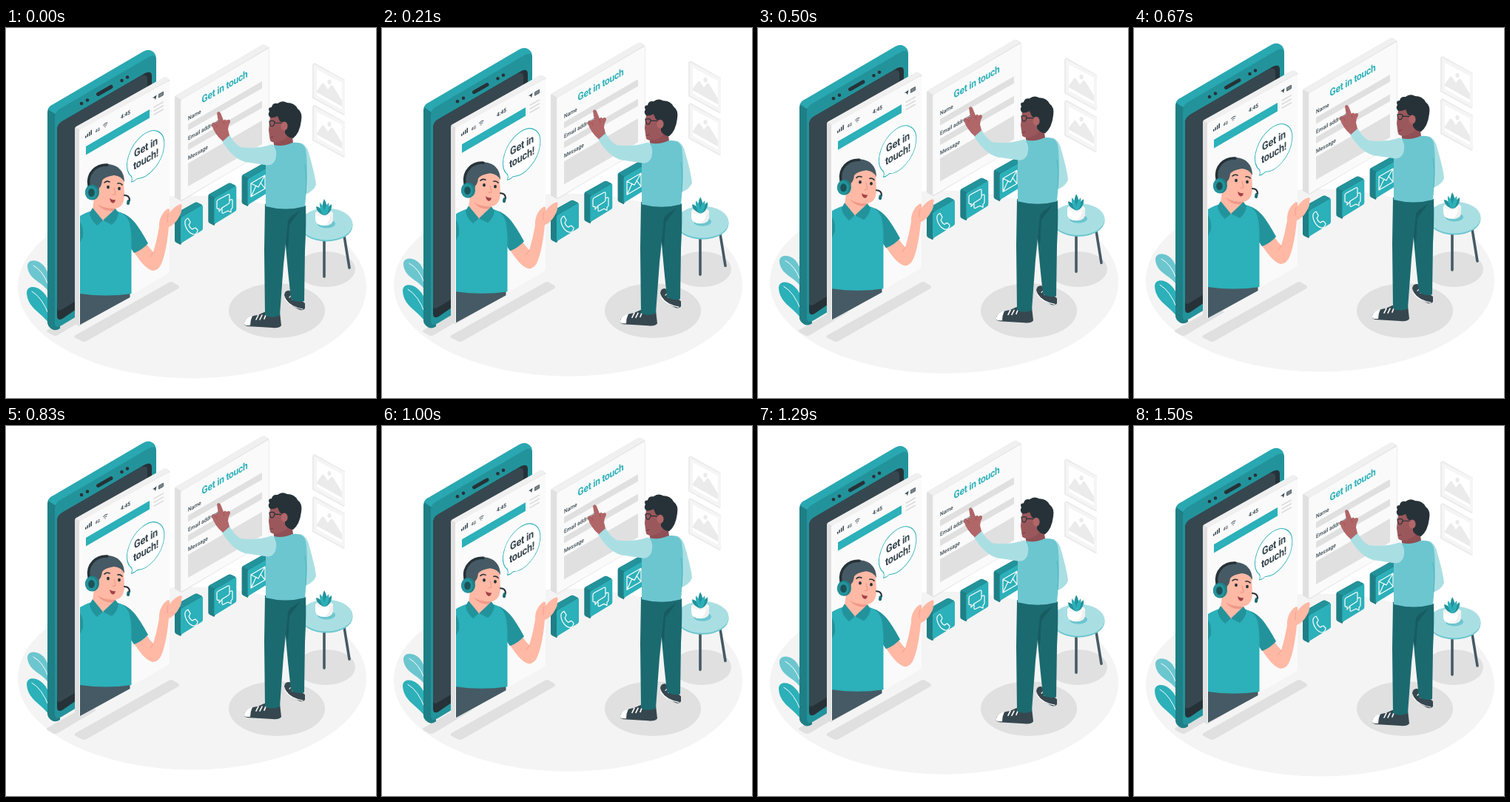
Recreate the animation shown at these times as an HTML page. Size 500 px wide and 500 px high, loop 1.54 s.

```html
<!DOCTYPE html>
<html lang="en">
<head>
<meta charset="utf-8">
<title>Get in touch</title>
<style>
  html, body { margin: 0; height: 100%; overflow: hidden; background: #fff; }
  svg { display: block; width: 100vw; height: 100vh; }
  text { font: 500 7.6px Roboto, sans-serif; fill: #37474f; }
  .bold { font-weight: 700; font-size: 14.6px; letter-spacing: -.25px; }
  .mid { text-anchor: middle; }
  .line { fill: none; stroke-linecap: round; stroke-linejoin: round; }
  .teal { fill: #2cb0b9; }
  .deep { fill: #23939b; }
  .shade { fill: #1f7f86; }
  .soft { fill: #6cc6cf; }
  .pale { fill: #a9dfe3; }
  .pants { fill: #1b6a70; }
  .dark { fill: #37474f; }
  .ink { fill: #263238; }
  .grey { fill: #e0e0e0; }
  .paper { fill: #fafafa; }
  .skin { fill: #ffb9a5; }
  .brown { fill: #b16668; }
  .white { stroke: #fff; }
</style>
</head>
<body>
<svg viewBox="0 0 500 500">
  <defs>
    <g id="picture">
      <path fill="#ebebeb" d="M414 49l3-2 41 23v47l-2 1-42-23z"/>
      <path fill="#f5f5f5" d="M416 49l42 22v46l-42-23z"/>
      <path fill="#fff" d="M420 56l34 18v36l-34-19z"/>
      <path fill="#ebebeb" d="M420 85l7-10q2-2 4 2l4 6 4-5q2-2 4 2l11 18v8l-34-19z"/>
      <ellipse cx="437" cy="73" rx="2.6" ry="3.2" fill="#ebebeb"/>
    </g>
    <g id="button">
      <path class="shade" d="M228 253q0-2 2-3l25-14q2-1 4 0l6 3-29 54-6-3q-2-1-2-3z"/>
      <path class="deep" d="M229 251l27-15q2-1 3 0l6 3-28 16z"/>
      <path class="teal" d="M236 258q0-2 2-3l26-15q2-1 2 1v30q0 2-2 3l-26 16q-2 1-2-1z"/>
    </g>
  </defs>

  <g class="float">
    <ellipse cx="251.5" cy="350" rx="235.5" ry="123.5" fill="#f4f4f4"/>
  </g>

  <g class="grey">
    <ellipse cx="432" cy="326" rx="40" ry="24"/>
    <ellipse cx="366" cy="382" rx="65" ry="37"/>
    <path d="M94 415L220 344q3-2 6 0l7 4q2 2 0 4L109 423q-4 2-7 0l-8-4q-3-2 0-4z"/>
    <path d="M56 408L110 377l12 7-52 31q-4 2-7 0l-7-4q-2-1 0-3z"/>
  </g>

  <g class="float">
    <use href="#picture"/>
    <use href="#picture" y="57"/>

    <!-- form -->
    <path class="grey" d="M228 94q0-2 2-3L346 23q2-1 4 0l5 3V163L239 233q-2 1-4 0l-7-4z"/>
    <path fill="#f0f0f0" d="M229 92L346 23q2-1 4 0l5 3L237 97z"/>
    <path class="paper" stroke="#e6e6e6" stroke-width=".7" d="M236 99q0-2 2-3L353.500 28q2-1 2 1V162q0 2-2 3L238 232.500q-2 1-2-1z"/>
    <text class="iso bold mid" data-at="295.500 84" style="font-size:13.800px;fill:#2cb0b9">Get in touch</text>
    <g class="grey">
      <path d="M246 130l100-58v9.500l-100 57z"/>
      <path d="M246 156.500l100-58v9.500l-100 57z"/>
      <path d="M246 183l100-58v32l-100 57z"/>
    </g>
    <text class="iso" data-at="246 125">Name</text>
    <text class="iso" data-at="246 152">Email address</text>
    <text class="iso" data-at="246 178.500">Message</text>

    <!-- contact buttons -->
    <use href="#button"/>
    <use href="#button" x="45.300" y="-26"/>
    <use href="#button" x="90.600" y="-52"/>
    <g class="line white" stroke-width="1.200">
      <path d="M242 261q1-3 4-4l3 5q0 2-2 4 2 5 5 6 2-2 4-2l3 3q0 4-4 6-5 0-9-5-5-7-4-13z"/>
      <path d="M285 235q0-2 2-3l13-7q2-1 2 1v9q0 2-2 3l-8 5-4 5v-4q-3 1-3-1zM302 233l2-1q2-1 2 1v9q0 2-2 3v4l-4-2-6 3q-2 1-2-1v-6"/>
      <path d="M331 210l19-11v18l-19 11zl10 5 9-16M331 228l7-15M350 217l-6-8"/>
    </g>

    <!-- floor plant -->
    <path class="soft" d="M58 357C50 343 31 341 29 323C28 314 38 312 46 317C53 321 57 330 58 337z"/>
    <path class="teal" d="M59 400C46 383 29 378 28 358C28 348 40 348 48 355C54 360 57 366 59 373z"/>
    <path class="line white" d="M37 321Q50 328 57 347M35 356Q49 364 58 388"/>

    <!-- phone -->
    <path class="shade" d="M56 114Q56 108 62 104L73 109V406Q67 410 62 407Q56 403 56 398z"/>
    <path fill="#29a8b1" d="M57 110Q58 106 62 104L185 32Q192 28 197 31Q203 34 203 42L73 112 66 116z"/>
    <path class="deep" d="M66 121Q66 113 73 109L193 39Q203 34 203 43V325L75 402Q66 407 66 398z"/>
    <path class="ink" d="M69 138Q69 130 76 126L188 61Q197 57 197 65V310L76 393Q69 396 69 389z"/>
    <path class="dark" d="M69 138Q69 130 76 126L182 65Q191 61 191 69V310L76 380Q69 384 69 378z"/>
    <path class="line" stroke="#263238" stroke-width="5" d="M124.500 89.500l17.500-10"/>
    <g class="ink">
      <circle cx="102" cy="102" r="2.300"/><circle cx="110" cy="97.500" r="2.300"/>
      <circle cx="156.500" cy="71" r="2.300"/><circle cx="164" cy="66.500" r="2.300"/>
    </g>

    <!-- floating screen -->
    <path class="grey" d="M93 136q0-2 2-3L213 67q2-1 4 0l4 3v260L101 402q-2 1-4 0l-4-3z"/>
    <path fill="#f0f0f0" d="M94 134L213 67q2-1 4 0l4 3L100 138z"/>
    <path class="paper" d="M99 140q0-2 2-3L219 72q2-1 2 1v256q0 2-2 3L101 401q-2 1-2-1z"/>
    <g class="dark">
      <path d="M107 146l1.500-.8v3l-1.500.8zm2.500-2.600l1.500-.8v4.200l-1.500.8zm2.500-2.600l1.500-.8v5.400l-1.500.8zm2.500-2.600l1.500-.8v6.600l-1.500.8z"/>
      <path d="M198 94.500l5.500-4-1.500 6.500-1.500-2.500z"/>
    </g>
    <path fill="#78848a" stroke="#37474f" stroke-width=".7" d="M206.500 89.500l6-3.400v4.600l-6 3.400z"/>
    <path class="line" stroke="#37474f" stroke-width="1" d="M131.500 131.500q2.500-3.800 5.500-3.500M132.700 132.800q1.600-2.300 3.300-2M134 134l.3-.2"/>
    <text class="iso" data-at="120.500 142" style="font-size:6px">4G</text>
    <text class="iso mid" data-at="161.500 119.500" style="font-size:7.500px;font-weight:700">4:45</text>
    <path class="teal" d="M108 160l86-50v11.500l-86 50z"/>
    <path class="line" stroke="#dcdcdc" stroke-width="1.600" d="M200 107l12.500-7M200 112l12.500-7M200 117l12.500-7"/>
    <path class="iso" data-at="188.500 171" fill="#fff" stroke="#2cb0b9" d="M-25 14.500A29 29 0 1 1-13 26Q-17 28-22 26Q-19 21-25 14.500z"/>
    <text class="iso bold mid" data-at="189 166">Get in</text>
    <text class="iso bold mid" data-at="189 182.500">touch!</text>

    <!-- agent -->
    <path fill="#455a64" d="M100 355h67.500v9L100 401z"/>
    <path class="skin" d="M173 303L190 292Q195 299 199 303Q204 287 207 269C206 257 213 247 219 244Q222 244 221 250Q228 240 236 238Q239 239 237 243Q238 248 234 255Q229 265 220 269Q217 300 211 316Q207 328 198 328C188 325 180 313 173 303z"/>
    <path class="line" stroke="#f0998a" stroke-width=".8" d="M219 251q-2 6-1 11M199 303l-4 6"/>
    <path class="deep" d="M150 249C168 250 178 266 192 291Q184 300 173 304L160 285z"/>
    <path class="teal" d="M100 254Q110 248 120 246L148 247Q163 250 167 264Q170 276 169.500 300V359Q135 364 100 359z"/>
    <path class="deep" d="M100 262q5 7 4 20l-4 8z"/>
    <path class="skin" d="M119 229h29v19L131 261 117 246z"/>
    <path fill="#f0998a" d="M124 238Q133 245 147 243V247Q131 249 124 238z"/>
    <path class="deep" d="M117 243L131 260 123 267Q114 259 113 250zM148 244L131 260 143 266Q151 259 152 250z"/>
    <path class="skin" d="M119 202Q121 192 138 192Q157 192 159 207L160 225Q160 243 146 244Q130 244 123 233Q118 224 119 202z"/>
    <path fill="#455a64" d="M112 213C109 195 122 183 138 184C152 185 160 194 160 208Q156 200 146 199Q133 201 130 206Q129 214 126 216L124 228Q113 227 112 213z"/>
    <path class="line" stroke="#263238" stroke-width="3.500" d="M112 213C109 196 122 184 137 185"/>
    <ellipse class="shade" cx="116.500" cy="222" rx="9.500" ry="10.500"/>
    <ellipse class="deep" cx="115" cy="222.500" rx="8" ry="9.500"/>
    <ellipse cx="115.500" cy="222.500" rx="4.300" ry="5.500" fill="#1c5258"/>
    <g class="ink">
      <ellipse cx="138" cy="215" rx="1.900" ry="2.300"/>
      <ellipse cx="153" cy="217" rx="1.900" ry="2.300"/>
    </g>
    <path class="line" stroke="#263238" stroke-width="1.600" d="M133 209q3-3 7-1M151 210q4-1 6 2"/>
    <path class="line" stroke="#f0998a" stroke-width="1.200" d="M146 216l2 8q-1 2-4 1"/>
    <path fill="#a34048" d="M140 230q4 3 8 2-1 5-4 4.500-3-1-4-6.500z"/>
    <path class="line" stroke="#263238" stroke-width="2" d="M160 226q7 0 7 7"/>
    <path class="line" stroke="#1b6a70" stroke-width="4" d="M165.500 234l-.5 3"/>

    <!-- side table -->
    <path class="line" stroke="#455a64" stroke-width="3.600" d="M430 286v50M457 281l7 43"/>
    <ellipse class="soft" cx="433" cy="267" rx="35.500" ry="21.500"/>
    <ellipse class="pale" cx="433" cy="265" rx="35.500" ry="21.500"/>
    <ellipse class="soft" cx="433" cy="264.500" rx="12" ry="6"/>
    <path fill="#fff" d="M418 250q12-5 24 0v9q-1 8-12 8t-12-8z"/>
    <path fill="#f0f0f0" d="M442 250v9q-1 8-12 8 8-4 8-16z"/>
    <ellipse cx="430" cy="250.500" rx="12" ry="4.500" fill="#f5f5f5"/>
    <path class="deep" d="M427 252q-8-4-8-11 6 1 9 7-2-8 2-17 5 8 3 17 2-7 7-10 1 9-6 14-4 2-7 0z"/>
    <path class="teal" d="M429 253q-6-8-5-17 6 5 6 13 1-8 6-13 2 10-4 17z"/>

    <!-- visitor -->
    <path class="dark" d="M376 361Q377 354 383 355L404 372V379Q401 383 395 380Q379 373 376 361z"/>
    <path class="line white" stroke-width="1.200" d="M377 366q7 11 24 14M383 364l4-4M387 367l3-4"/>
    <path class="dark" d="M322 398Q324 390 340 388L349 384H370L372 402Q369 406 360 405L326 403Q321 402 322 398z"/>
    <path fill="#fff" d="M322 398Q324 391 333 389Q330 395 330 402L325 402Q321 401 322 398z"/>
    <path class="line white" stroke-width="1.600" d="M338 394l3-6M343 394l3-6M349 393l2-5"/>
    <path class="pants" d="M374 240H405Q406 265 404 300L403 369Q394 372 385 366Q381 330 378 295z"/>
    <path fill="#175b60" d="M380 258L398 246 383 266 381 300 377 288z"/>
    <path class="pants" d="M350 238H396L381 260Q378 292 375 320L370 388Q360 393 350 388L349 300z"/>
    <path class="pale" d="M398 155Q407 158 410 172Q418 200 419 212Q416 220 405 225L394 200z"/>
    <path fill="#8f4f54" d="M361 145L386 141 389 162Q375 167 362 158z"/>
    <path class="brown" style="fill:#9b585c" d="M357 120Q356 128 355 138L357 152Q360 156 368 154Q382 150 387 136L382 116z"/>
    <path class="soft" d="M362 158Q374 161 387 155Q402 153 405 164Q409 190 404 241Q378 248 351 241L351 184z"/>
    <path class="line" stroke="#4fb4bd" stroke-width="1" d="M404 185q3 16 1 38"/>
    <path class="pale" d="M302 144Q308 156 317 161Q340 164 360 157Q368 165 364 178Q360 187 350 185L323 181Q306 176 292 153z"/>
    <path class="brown" d="M293 153Q282 144 278 131Q279 126 283 129Q284 126 287 127L285 115Q287 111 290 115L294 125Q296 122 298 125Q303 122 303 127Q300 132 300 137L302 145z"/>
    <path class="line" stroke="#8f4f54" stroke-width=".7" d="M283 130l2 4M294 126l1 4"/>
    <path class="ink" d="M357 121Q353 117 356 113Q353 107 359 107Q360 101 367 102Q373 97 380 101Q390 101 394 109Q401 114 399 125Q397 142 388 149Q380 148 377 142L377 130 370 126 367 119Q361 122 357 121z"/>
    <ellipse class="brown" cx="376" cy="132.500" rx="4.600" ry="6"/>
    <path class="line" stroke="#263238" stroke-width="1.200" d="M356 126q4-1.500 7 .5 0 5.500-3.500 6.500-3-.5-3.500-7zM363 128l9 .5"/>
    <path class="line" stroke="#6e3a40" stroke-width="1" d="M357 148l4-1"/>
  </g>
</svg>
<script>
  const PERIOD = 1540, HALF = 750, LIFT = 10;
  const floating = document.querySelectorAll('.float');

  // Shapes and labels lying on the isometric wall plane
  for (const item of document.querySelectorAll('.iso'))
    item.setAttribute('transform', `matrix(.866 -.5 0 1 ${item.dataset.at})`);

  function draw(now) {
    const t = now % PERIOD;
    const lift = LIFT * Math.max(0, 1 - Math.abs(t - HALF) / HALF);
    for (const part of floating) part.setAttribute('transform', `translate(0 ${-lift})`);
    requestAnimationFrame(draw);
  }
  draw(performance.now());
</script>
</body>
</html>
```
